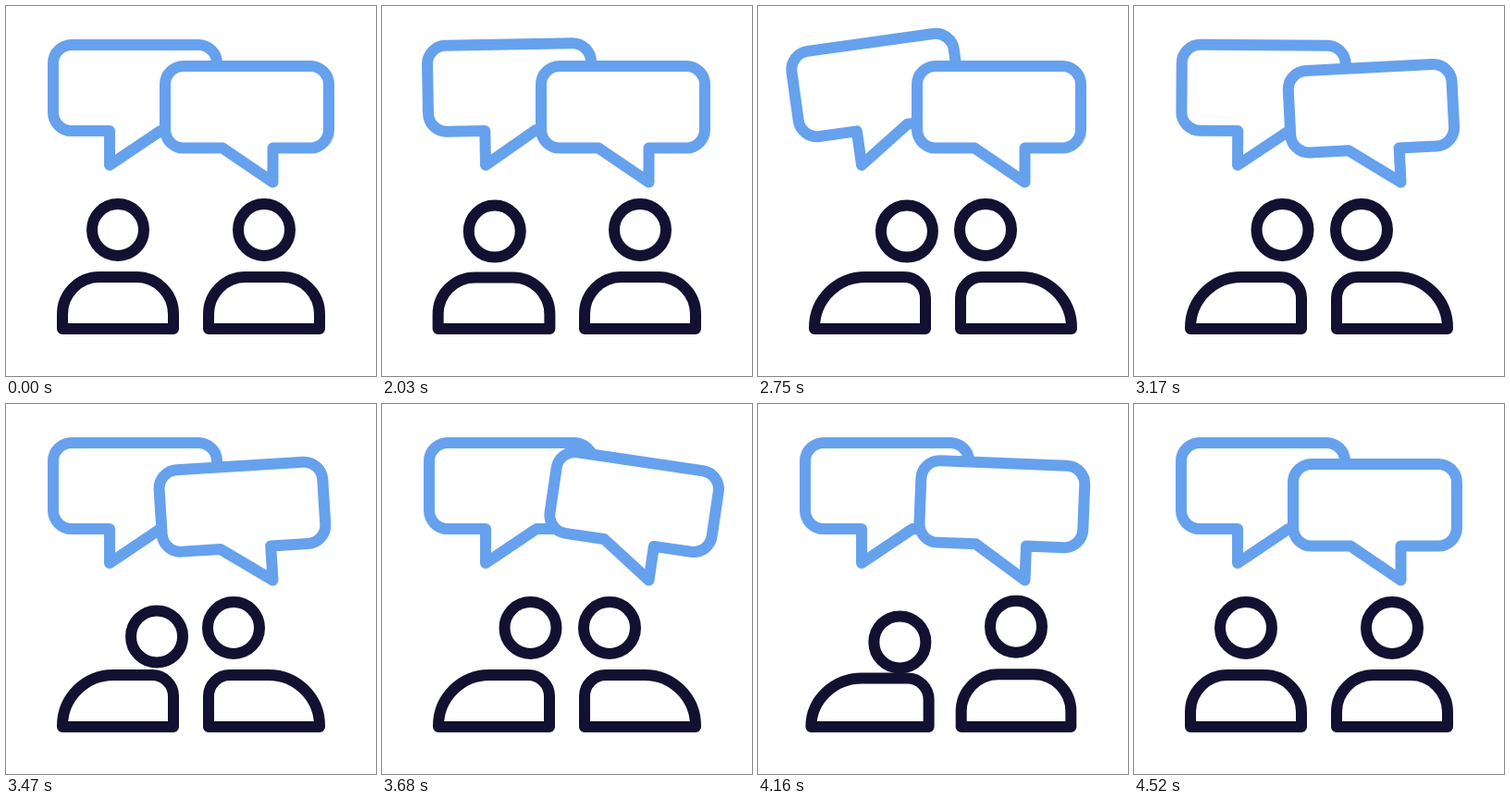
An HTML page for the animation above (4.55 s loop, 400 by 400 pixels).

```html
<!DOCTYPE html>
<html lang="en">
<head>
<meta charset="utf-8">
<title>Conversation</title>
<style>
  html, body { margin: 0; width: 100%; height: 100%; overflow: hidden; background: #fff; }
  svg { display: block; width: 100vw; height: 100vh; }
  path, circle { stroke-width: 12; stroke-linejoin: round; stroke-linecap: round; }
  .bubble { fill: #fff; stroke: #66a1ee; }
  .person { fill: none; stroke: #121131; }
</style>
</head>
<body>
<svg viewBox="0 0 400 400">
  <path id="bubbleL" class="bubble" d="M112 135V172L167 135H208A20 20 0 0 0 228 115V62A20 20 0 0 0 208 42H71A20 20 0 0 0 51 62V115A20 20 0 0 0 71 135Z"/>
  <path id="bubbleR" class="bubble" d="M288.5 153.5V190.5L234 153.5H192A20 20 0 0 1 172 133.5V85A20 20 0 0 1 192 65H329A20 20 0 0 1 349 85V133.5A20 20 0 0 1 329 153.5Z"/>
  <g class="person">
    <path id="bodyL"/><circle id="headL" r="28"/>
  </g>
  <g class="person" transform="translate(400 0) scale(-1 1)">
    <path id="bodyR"/><circle id="headR" r="28"/>
  </g>
</svg>
<script>
const LOOP = 4550, HOLD = 2000, STEP = 30, LAST = 84;
const $ = id => document.getElementById(id);

// Sine ease from 0 to 1 between steps a and b.
function ramp(n, a, b) {
  const p = Math.min(1, Math.max(0, (n - a) / (b - a)));
  return (1 - Math.cos(Math.PI * p)) / 2;
}

// Decaying swing of a bubble: the steps and angles where it reverses.
const SWING = [[0, 0], [7, -21], [16.5, 14.4], [23, -9], [33, 2.6], [41, 0]];
const swing = n => SWING.slice(1).reduce((angle, [b, to], i) => {
  const [a, from] = SWING[i];
  return angle + (to - from) * ramp(n, a, b);
}, 0);

// A turn dips and widens the figure, springs up facing the other way, then settles.
const dip = n => ramp(n, 0, 5) - 1.2 * ramp(n, 5, 10) + 0.2 * ramp(n, 10, 14);
const shift = n => 0.2 * ramp(n, 0, 5) + 0.8 * ramp(n, 5, 10);
const morph = n => ramp(n, 4, 10);

// Two nods in a row, starting at step 23.
const nod = n => n > 23 && n < 55 ? Math.sin(Math.PI * (n - 23) / 16) ** 2 : 0;

function person(side, n, { turn, back, reach, nodding = 0 }) {
  const a = n - turn, b = n - back;
  const s = dip(a) + dip(b);
  const m = morph(a) - morph(b);
  const head = $('head' + side);
  head.setAttribute('cx', 121 + reach * (shift(a) - shift(b)) + 3 * nodding);
  head.setAttribute('cy', 242 + (s > 0 ? 17 : 8) * s + 11 * nodding);

  const left = 61 - 4 * s, right = 181 + 4 * s, top = 293 + 4 * s;
  const rBack = 40 + 15 * m, rFront = 40 - 17 * m;
  const hBack = Math.min(rBack, 349 - top);
  $('body' + side).setAttribute('d',
    `M${left} 349V${top + hBack}A${rBack} ${hBack} 0 0 1 ${left + rBack} ${top}` +
    `H${right - rFront}A${rFront} ${rFront} 0 0 1 ${right} ${top + rFront}V349Z`);
}

function draw(t) {
  const n = Math.min(LAST, Math.max(0, Math.floor((t % LOOP - HOLD) / STEP)));
  $('bubbleL').setAttribute('transform', `rotate(${swing(n)} 112 172)`);
  $('bubbleR').setAttribute('transform', `rotate(${swing(n - 37.3)} 288.5 190.5)`);
  person('L', n, { turn: 0, back: 68, reach: 39.5, nodding: nod(n) });
  person('R', n, { turn: 2, back: 61, reach: 33 });
}

const start = performance.now();
function tick() {
  draw(performance.now() - start);
  requestAnimationFrame(tick);
}
tick();
</script>
</body>
</html>
```
